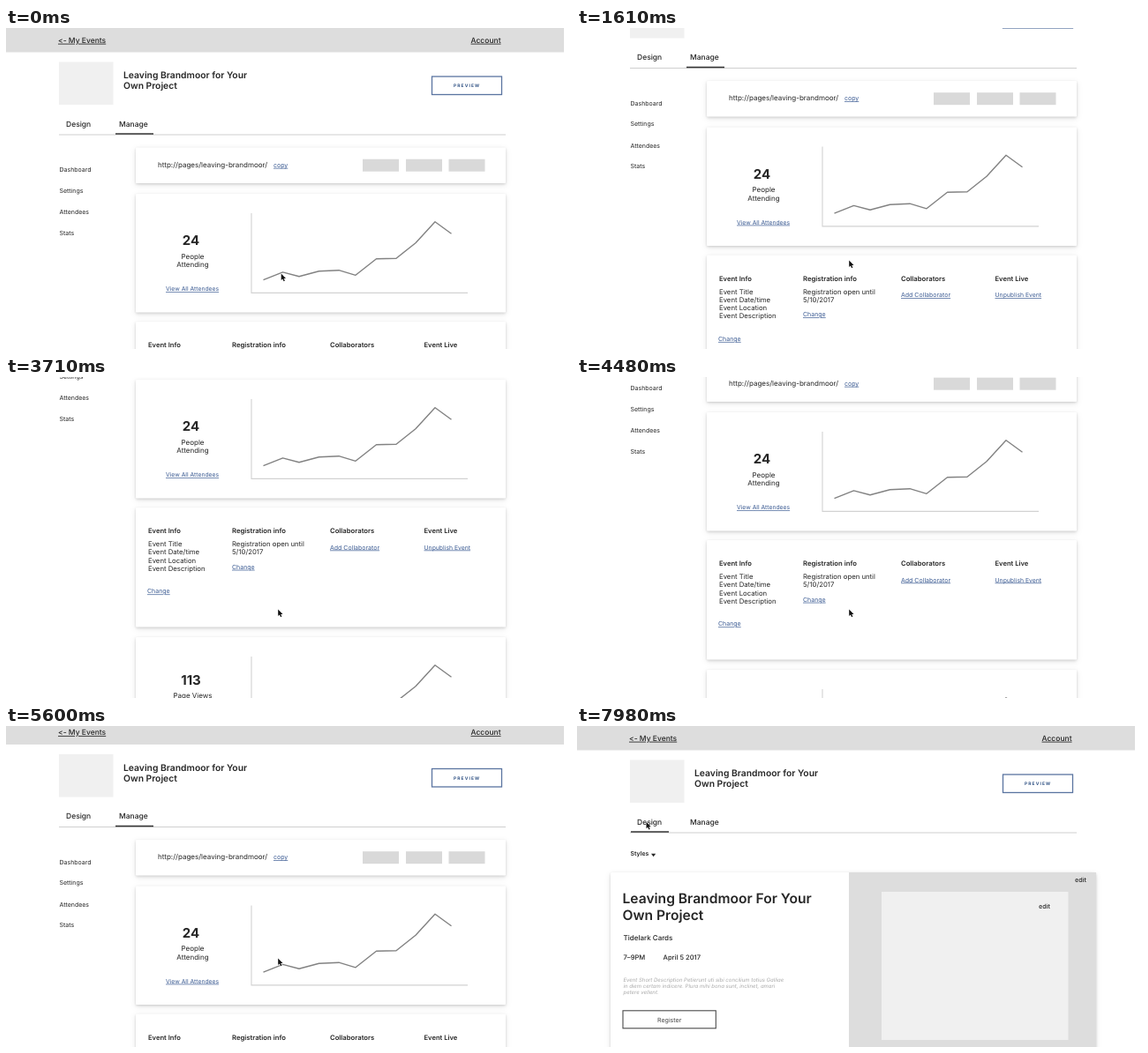
Write an HTML page that moves like this. It is 640 px wide and 364 px high and loops after 8 s.

```html
<!DOCTYPE html>
<html lang="en">
<head>
<meta charset="utf-8">
<title>Event manager</title>
<style>
  html, body { margin: 0; width: 100%; height: 100%; overflow: hidden; background: #fff; }
  svg { display: block; }
  text {
    font-family: Inter, "Open Sans", sans-serif; font-variant-ligatures: none;
    text-rendering: geometricPrecision; white-space: pre;
  }
  .card { filter: drop-shadow(0 1.5px 1.5px rgba(0, 0, 0, .14)) drop-shadow(0 2px 3px rgba(0, 0, 0, .1)); }
</style>
</head>
<body>
<svg id="stage" width="640" height="364" viewBox="0 0 640 364"></svg>
<script>
const LOOP = 8000, STEP = 70;
const INK = '#262626', BLUE = '#3a5a92', GREY = '#ddd', PALE = '#f0f0f0';
const stage = document.getElementById('stage');

function add(parent, tag, attrs = {}) {
  const el = document.createElementNS('http://www.w3.org/2000/svg', tag);
  for (const key in attrs) el.setAttribute(key, attrs[key]);
  parent.append(el);
  return el;
}
const group = (parent, attrs) => add(parent, 'g', attrs);
const rect = (g, x, y, width, height, fill, more) =>
  add(g, 'rect', { x, y, width, height, fill, ...more });
const path = (g, d, stroke, width, more) =>
  add(g, 'path', { d, stroke, 'stroke-width': width, fill: 'none', ...more });
function text(g, x, y, size, str, more) {
  add(g, 'text', { x, y, 'font-size': size, fill: INK, ...more }).textContent = str;
}
const lines = (g, x, y, pitch, size, list, more) =>
  list.forEach((str, i) => text(g, x, y + i * pitch, size, str, more));
const link = (g, x, y, size, str) =>
  text(g, x, y, size, str, { fill: BLUE, 'text-decoration': 'underline' });
const card = (g, y, height) =>
  rect(g, 147, y, 419, height, '#fff', { class: 'card', rx: 1 });

function pageTop(g, tabX) {
  const medium = { 'font-weight': 500 };
  const underlined = { ...medium, 'text-decoration': 'underline' };
  rect(g, 0, 0, 632, 27.5, GREY);
  text(g, 59, 16.7, 8.5, '<- My Events', underlined);
  text(g, 526.5, 16.7, 8.5, 'Account', underlined);
  rect(g, 60, 38.5, 61.5, 48.5, PALE);
  lines(g, 133, 57.2, 12, 10.35, ['Leaving Brandmoor for Your', 'Own Project'], { 'font-weight': 600 });
  rect(g, 482.5, 55, 79, 20.5, 'none', { stroke: '#5a74a0', 'stroke-width': 1.3 });
  text(g, 507, 67.2, 4.9, 'PREVIEW', { fill: '#2f5183', 'font-weight': 700, 'letter-spacing': 1.1 });
  text(g, 68, 111.6, 8.5, 'Design', medium);
  text(g, 128, 111.6, 8.5, 'Manage', medium);
  path(g, 'M60 121H566', '#cfcfcf', 1.1);
  path(g, `M${tabX} 120h43`, '#333', 1.5);
}

function chartCard(g, top, count, label, shift) {
  const mid = { 'text-anchor': 'middle' };
  card(g, top, 134.5);
  text(g, 209.5, top + 58.3 - shift, 15, count, { ...mid, 'font-weight': 700 });
  lines(g, 211.5, top + 73.8 - shift, 9.3, 8, label, mid);
  link(g, 181, top + 110.1, 6.8, 'View All Attendees');
  path(g, `M278 ${top + 22}v90.4h245`, '#d2d2d2', 1.1);
  path(g, 'M291.5 98L313.5 89.2 332 94 354.5 88 377 87 396 92.6 419.5 74 442 73.5 464 56 486 32 504.5 45.5',
    '#828282', 1.4, { transform: `translate(0 ${top - .3})`, 'stroke-linejoin': 'round' });
}

function managePage(g) {
  const bold = { 'font-weight': 600 };
  pageTop(g, 124);
  ['Dashboard', 'Settings', 'Attendees', 'Stats'].forEach((str, i) =>
    text(g, 60.5, [163.4, 186.9, 211.4, 234.9][i], 7, str));

  card(g, 135.5, 40.5);
  text(g, 172, 157.8, 8, 'http://pages/leaving-brandmoor/');
  link(g, 303, 157.8, 7, 'copy');
  for (const x of [404, 453, 501.5]) rect(g, x, 148.7, 41, 14, '#d9d9d9');

  chartCard(g, 188, '24', ['People', 'Attending'], 0);

  card(g, 333, 135.5);
  text(g, 161, 362.3, 7.6, 'Event Info', bold);
  text(g, 256, 362.3, 7.7, 'Registration info', bold);
  text(g, 367, 362.3, 7.7, 'Collaborators', bold);
  text(g, 473.5, 362.3, 7.6, 'Event Live', bold);
  lines(g, 161, 377, 9.3, 7.75, ['Event Title', 'Event Date/time', 'Event Location', 'Event Description']);
  link(g, 160, 430.4, 7, 'Change');
  lines(g, 256, 377, 9.3, 7.75, ['Registration open until', '5/10/2017']);
  link(g, 256, 402.7, 7, 'Change');
  link(g, 367, 380.5, 7, 'Add Collaborator');
  link(g, 473.5, 380.5, 6.85, 'Unpublish Event');

  chartCard(g, 480, '113', ['Page Views'], 4.7);
}

function designPage(g) {
  const medium = { 'font-weight': 500 };
  pageTop(g, 61);
  text(g, 60.5, 147.1, 6.9, 'Styles', { 'font-weight': 600 });
  add(g, 'path', { d: 'M84 144.8h5.2l-2.6 3.4z', fill: INK });
  rect(g, 38, 166, 550, 220, '#fff', { class: 'card', rx: 2 });
  rect(g, 308, 166, 280, 200, GREY);
  rect(g, 345, 188, 211.5, 168, PALE);
  text(g, 564, 177.3, 7.2, 'edit', medium);
  text(g, 523, 207.3, 7.2, 'edit', medium);
  lines(g, 51.5, 201.2, 18.7, 15.6, ['Leaving Brandmoor For Your', 'Own Project'], { 'font-weight': 600 });
  text(g, 52.5, 243, 8, 'Tidelark Cards', medium);
  text(g, 52.5, 265.4, 7.6, '7–9PM', medium);
  text(g, 97.5, 265.4, 7.6, 'April 5 2017', medium);
  lines(g, 52.5, 289.8, 7, 6, [
    'Event Short Description Petierunt uti sibi concilium totius Galliae',
    'in diem certam indicere. Plura mihi bona sunt, inclinet, amari',
    'petere vellent.'
  ], { fill: '#aaa', 'font-style': 'italic' });
  rect(g, 52, 322.8, 105.3, 20, '#fff', { stroke: '#4a4a4a', 'stroke-width': 1.1 });
  text(g, 104.7, 335.6, 7.1, 'Register', { 'text-anchor': 'middle', fill: '#444' });
}

const manage = group(stage), design = group(stage), pointer = group(stage);
managePage(manage);
designPage(design);
const ring = add(pointer, 'circle', { r: 17.5, fill: 'none', stroke: '#222', 'stroke-width': 2 });
add(pointer, 'path', {
  d: 'M0 0V7.4L1.7 5.9 2.9 8.7 4.2 8.1 3 5.4H5.3Z',
  fill: '#111', stroke: '#fff', 'stroke-width': .8, 'paint-order': 'stroke'
});

// [ms, value] tables
const scrollKeys = [[630, 0], [1120, 24], [1610, 75.5], [2310, 151.5], [2700, 174], [3080, 182],
  [3220, 182], [3430, 184], [3500, 184], [3710, 185], [3850, 186], [4060, 186],
  [4480, 148], [4970, 80.5], [5600, 6.5], [5740, 0]];
const pointerKeys = [[630, 311.7, 278.5], [980, 308.2, 263.5], [6440, 308.2, 263.5], [7210, 78.5, 108.8]];

// Monotone cubic interpolation
function curve(keys, t) {
  const last = keys.length - 1;
  if (t <= keys[0][0]) return keys[0][1];
  if (t >= keys[last][0]) return keys[last][1];
  const slope = i => (keys[i + 1][1] - keys[i][1]) / (keys[i + 1][0] - keys[i][0]);
  const tangent = i => {
    if (i === 0 || i === last) return 0;
    const a = slope(i - 1), b = slope(i);
    return a * b > 0 ? 2 * a * b / (a + b) : 0;
  };
  const i = keys.findIndex(k => k[0] > t) - 1;
  const [t0, v0] = keys[i], [t1, v1] = keys[i + 1];
  const h = t1 - t0, u = (t - t0) / h, w = 1 - u;
  return v0 * (1 + 2 * u) * w * w + h * tangent(i) * u * w * w
    + v1 * u * u * (3 - 2 * u) - h * tangent(i + 1) * u * u * w;
}

function draw(now) {
  const t = Math.floor(now % LOOP / STEP) * STEP;
  const onDesign = t >= 7980;
  manage.style.display = onDesign ? 'none' : '';
  design.style.display = onDesign ? '' : 'none';
  manage.setAttribute('transform', `translate(0 ${-curve(scrollKeys, t).toFixed(2)})`);
  const [x, y] = [1, 2].map(n => curve(pointerKeys.map(k => [k[0], k[n]]), t).toFixed(2));
  pointer.setAttribute('transform', `translate(${x} ${y})`);
  ring.style.display = t >= 7560 && t < 7700 ? '' : 'none';
}

const start = performance.now();
function tick() {
  draw(performance.now() - start);
  requestAnimationFrame(tick);
}
tick();
</script>
</body>
</html>
```
